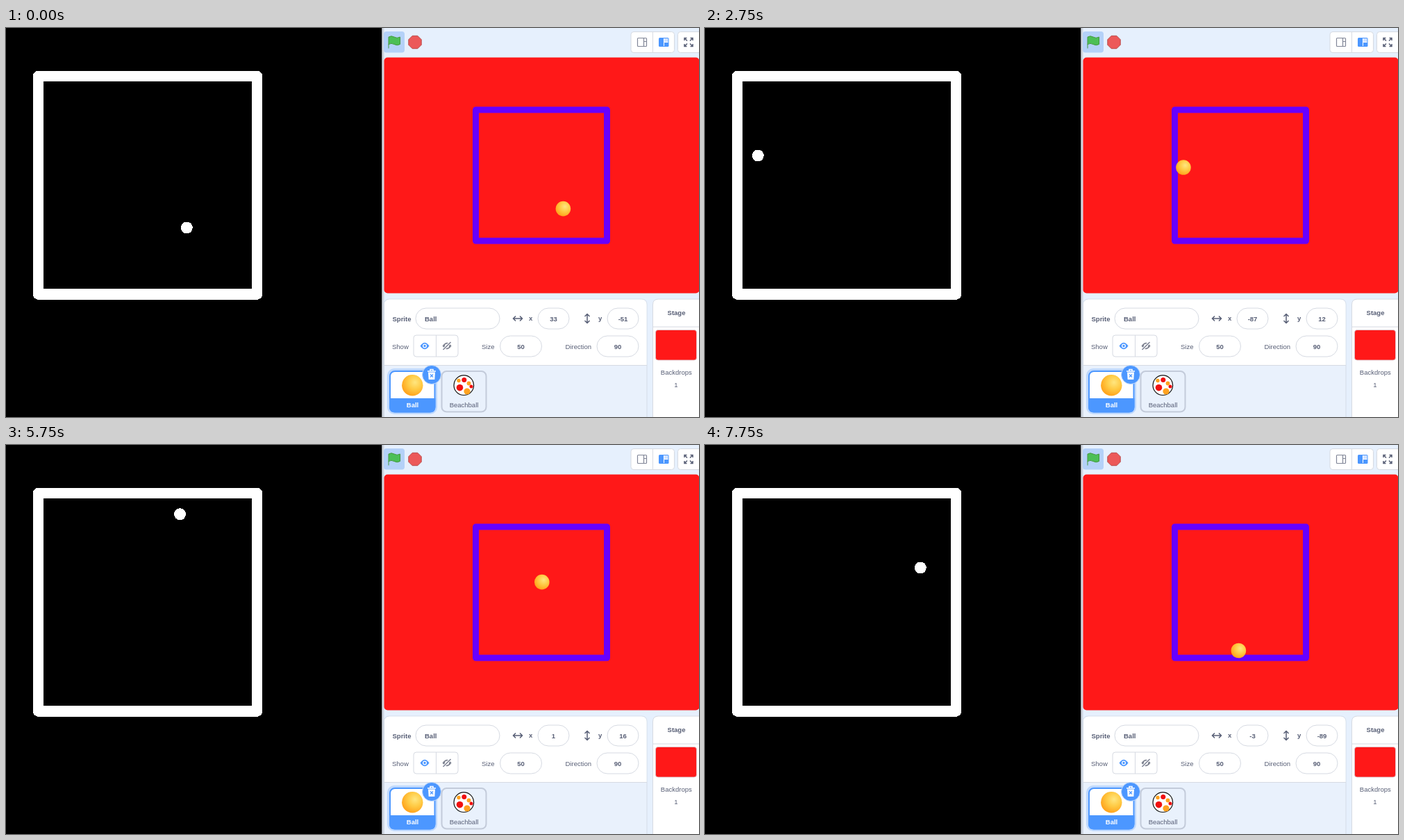
An HTML page that plays this animation: 998x561 px, repeating every 8000 ms.

```html
<!DOCTYPE html>
<html lang="en">
<head>
<meta charset="utf-8">
<title>Bouncing balls</title>
<style>
  html, body { margin: 0; width: 100%; height: 100%; overflow: hidden; background: #e6f0fd; }
  svg { display: block; font: 9.5px "Liberation Sans", Arial, sans-serif; }
  text { fill: #575e75; text-anchor: middle; }
  .bold { font-weight: bold; }
  .left { text-anchor: start; }
  .box { fill: #fff; stroke: #d6dae2; }
  .line { fill: none; stroke: #575e75; stroke-width: 1.5; }
  .crisp { shape-rendering: crispEdges; }
</style>
</head>
<body>
<svg width="998" height="561" viewBox="0 0 998 561">
  <defs>
    <radialGradient id="orange" cx=".62" cy=".36" r=".66">
      <stop offset="0" stop-color="#ffe680"/>
      <stop offset=".5" stop-color="#ffcb45"/>
      <stop offset="1" stop-color="#ffa31c"/>
    </radialGradient>
    <linearGradient id="edge">
      <stop offset="0" stop-color="#bfc4cc"/>
      <stop offset="1" stop-color="#e6f0fd"/>
    </linearGradient>
    <path id="arrows" class="line" d="M-6 0H6M-3 -3.5L-6.5 0L-3 3.5M3 -3.5L6.5 0L3 3.5" stroke-width="2"/>
    <path id="eye" d="M-6.5 0Q0 -9.5 6.5 0Q0 9.5 -6.5 0Z"/>
    <path id="corner" d="M2 -2L5.5 -5.5M2.5 -6H6V-2.5" class="line"/>
  </defs>

  <!-- pen drawing -->
  <rect width="541.5" height="561"/>
  <rect x="541.5" width="4" height="561" fill="url(#edge)"/>
  <path class="crisp" fill="none" stroke="#fff" stroke-width="15.5" stroke-linejoin="round" d="M46.5 69.5H361.5V384H46.5Z"/>
  <circle id="dot" class="crisp" r="8.5" fill="#fff"/>

  <!-- toolbar -->
  <rect x="544" y="5" width="30" height="30.5" rx="4" fill="#b4d1f8"/>
  <path d="M551 29V13Q555 10.500 559 13T567.500 13V23.500Q563 26 559 23.500T551 23.500" fill="#4cbf56" stroke="#45993d" stroke-linejoin="round" stroke-linecap="round"/>
  <path d="M585.200 11.300H592.800L598.200 16.700V24.300L592.800 29.700H585.200L579.800 24.300V16.700Z" fill="#ec5959" stroke="#b84848" stroke-linejoin="round"/>
  <rect class="box" x="900" y="5.500" width="62.500" height="30" rx="4"/>
  <path class="box" d="M931.500 5.500V35.500"/>
  <rect class="box" x="967.500" y="5.500" width="40" height="30" rx="4"/>
  <g class="line" style="stroke-width:1.200" opacity=".75">
    <rect x="909.500" y="14.500" width="13" height="12" rx="1"/>
    <path d="M918.500 14.500V26.500M918.500 19.500H922.500"/>
  </g>
  <rect x="940" y="14" width="14.500" height="13" rx="1.500" fill="#4c97ff"/>
  <path d="M947.500 15V26M947.500 20.500H953.500" stroke="#fff"/>
  <rect x="948" y="15" width="5.500" height="5" fill="#cfe2ff"/>
  <g transform="translate(983 20.500)">
    <use href="#corner"/><use href="#corner" transform="rotate(90)"/>
    <use href="#corner" transform="rotate(180)"/><use href="#corner" transform="rotate(270)"/>
  </g>

  <!-- stage -->
  <rect x="544.500" y="42.500" width="454" height="340" rx="5" fill="#ff1818"/>
  <path fill="none" stroke="#60f" stroke-width="9" stroke-linejoin="round" d="M676.500 118H865.500V307H676.500Z"/>
  <circle id="ball" r="10.800" fill="url(#orange)"/>

  <!-- sprite panel -->
  <path d="M544.500 570V399Q544.500 391 552.500 391H915Q923 391 923 399V570Z" fill="#e9f1fc" stroke="#d3dbe7"/>
  <path d="M545 486.500V399Q545 391.500 552.500 391.500H915Q922.500 391.500 922.500 399V486.500Z" fill="#fff"/>
  <path d="M545 486.500H923" stroke="#d6dae2"/>
  <g id="fields"></g>
  <use href="#arrows" x="737" y="419"/>
  <use href="#arrows" transform="translate(837 419) rotate(90)"/>
  <rect class="box" x="587" y="443" width="64" height="31" rx="4"/>
  <path class="box" d="M619.500 443V474"/>
  <g transform="translate(603 458.500)">
    <use href="#eye" fill="#4c97ff"/><circle r="3" fill="#fff"/><circle r="1.700" fill="#4c97ff"/>
  </g>
  <g transform="translate(635 458.500)">
    <use href="#eye" fill="#7d8290"/><circle r="3" fill="#fff"/><circle r="1.700" fill="#7d8290"/>
    <path d="M-5 5L5 -5" stroke="#fff" stroke-width="3.500"/><path d="M-5.500 5.500L5.500 -5.500" class="line" opacity=".8"/>
  </g>

  <!-- sprite tiles -->
  <rect x="549" y="491" width="72" height="66" rx="10" fill="#bfd9fd"/>
  <rect x="553" y="495" width="64.500" height="58.500" rx="7" fill="#fff" stroke="#4c97ff" stroke-width="2"/>
  <path d="M552 534H618.500V546.500Q618.500 554.500 610.500 554.500H560Q552 554.500 552 546.500Z" fill="#4c97ff"/>
  <circle cx="585.300" cy="515.300" r="15.200" fill="url(#orange)"/>
  <text class="bold" x="585.500" y="547" style="fill:#fff">Ball</text>
  <circle cx="613" cy="500" r="13.500" fill="#4c97ff" stroke="#bfd9fd"/>
  <path d="M607 495H619M611 494.500V492.500H615V494.500" fill="none" stroke="#fff" stroke-width="1.500"/>
  <path d="M608 496.500H618L617.300 507H608.700Z" fill="#fff"/>
  <path d="M611 499.500L615 503.500M615 499.500L611 503.500" stroke="#4c97ff" stroke-width="1.300"/>
  <rect x="627.500" y="495" width="64" height="58.500" rx="7" fill="#e9f1fc" stroke="#c3cbda" stroke-width="2"/>
  <circle cx="659.300" cy="515.200" r="14.300" fill="#fff" stroke="#111" stroke-width="1.200"/>
  <g fill="#f01010">
    <circle cx="653.500" cy="518.700" r="4.800"/><circle cx="659.800" cy="507.500" r="3.500"/><circle cx="670" cy="517" r="2.500"/>
  </g>
  <g fill="#ffa21f">
    <circle cx="652" cy="508.500" r="2.700"/><circle cx="666.500" cy="512.500" r="2.900"/><circle cx="664" cy="524" r="4.600"/>
  </g>
  <text x="659.500" y="547">Beachball</text>

  <!-- backdrop panel -->
  <path d="M931.500 570V399Q931.500 391 939.500 391H1005V570Z" class="box"/>
  <path d="M932 431H998" stroke="#d6dae2"/>
  <text class="bold" x="965.500" y="414">Stage</text>
  <rect x="935.500" y="435.500" width="59" height="43.500" rx="3.500" fill="#ff1818" stroke="#d8c4cc" stroke-width=".8"/>
  <text x="965.300" y="499.500">Backdrops</text>
  <text x="965" y="517.500">1</text>
</svg>
<script>
const $ = id => document.getElementById(id);

const field = (x, y, w, value, id) =>
  `<rect class="box" x="${x}" y="${y - 15}" width="${w}" height="30" rx="15"/>` +
  `<text class="bold" x="${x + w / 2}" y="${y + 3.5}" id="${id}">${value}</text>`;
const label = (x, y, value, style = '') => `<text class="left ${style}" x="${x}" y="${y + 3.5}">${value}</text>`;

$('fields').innerHTML =
  `<rect class="box" x="590" y="404" width="121" height="30" rx="15"/>` +
  label(556.5, 419, 'Sprite', 'bold') + label(603, 419, 'Ball', 'bold') +
  label(753, 418.5, 'x', 'bold') + field(766, 419, 45, '', 'xValue') +
  label(853, 418.5, 'y', 'bold') + field(866, 419, 45, '', 'yValue') +
  label(556, 459, 'Show') + label(685, 459, 'Size') + field(711.5, 459, 60, 50, 'size') +
  label(805.5, 459, 'Direction') + field(851, 459, 60, 90, 'direction');

const STEP = 250, LOOP = 8000;
const ticks = [0, 7, 11, 15, 20, 25, 31];

// Distance travelled along one axis after n ticks; the pace varies slightly.
function travelled(marks, n) {
  const i = Math.max(1, ticks.findIndex(tick => tick >= n));
  const part = (n - ticks[i - 1]) / (ticks[i] - ticks[i - 1]);
  return marks[i - 1] + (marks[i] - marks[i - 1]) * part;
}

// Reflects a straight path between two walls.
function bounce(v, lo, hi) {
  const w = hi - lo, cycle = 2 * w;
  return lo + w - Math.abs(((v - lo) % cycle + cycle) % cycle - w);
}

const place = (el, x, y) => el.setAttribute('transform', `translate(${x} ${y})`);

function draw() {
  const n = Math.floor(performance.now() % LOOP / STEP);
  place($('dot'),
    bounce(260.3 - travelled([0, 118, 184, 252, 337, 420, 518], n), 62, 346),
    bounce(288 - travelled([0, 67, 104, 143, 191, 239, 297], n), 84, 368));
  const x = bounce(33 + travelled([0, 160, 248, 338, 450, 564, 700], n), -92, 92);
  const y = bounce(-51 - travelled([0, 90, 141, 192, 255, 319, 398], n), -90, 90);
  place($('ball'), 771.2 + x * 0.945, 212.4 - y * 0.945);
  $('xValue').textContent = Math.round(x);
  $('yValue').textContent = Math.round(y);
  requestAnimationFrame(draw);
}
draw();
</script>
</body>
</html>
```
